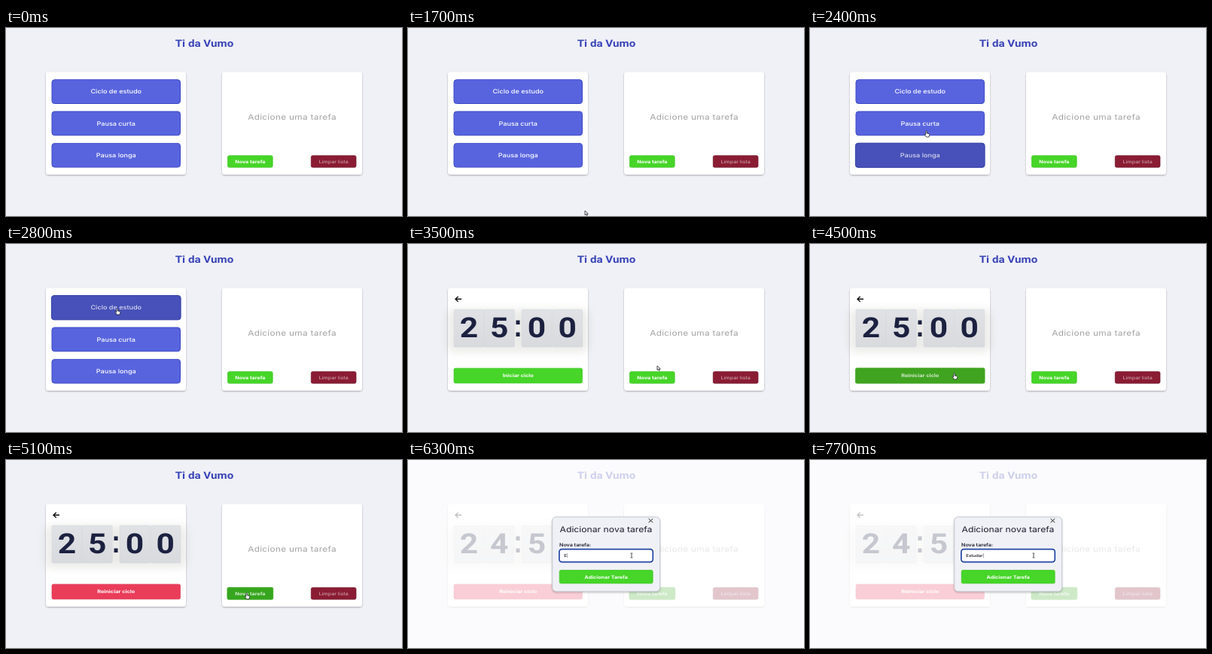
An HTML page that plays this animation: 526 px wide and 250 px high, repeating every 8000 ms.

```html
<!DOCTYPE html>
<html lang="pt">
<head>
<meta charset="utf-8">
<title>Ti da Vumo</title>
<style>
  html, body { margin: 0; width: 100%; height: 100%; overflow: hidden; background: #f0f1f6; }
  svg { display: block; width: 526px; height: 250px; }
  text { font-family: Inter, "Open Sans", sans-serif; text-rendering: geometricPrecision; }
  .square { font-family: Roboto, "Liberation Sans", sans-serif; }
</style>
</head>
<body>
<svg viewBox="0 0 526 250" xmlns="http://www.w3.org/2000/svg">
  <defs>
    <filter id="soft" x="-20%" y="-40%" width="140%" height="180%"><feGaussianBlur stdDeviation="6"/></filter>
    <filter id="lift" x="-5%" y="-5%" width="110%" height="115%">
      <feDropShadow dx="0" dy="1" stdDeviation="1.2" flood-color="#000" flood-opacity=".3"/>
    </filter>
    <linearGradient id="flap" x1="0" y1="0" x2="0" y2="1">
      <stop offset="0" stop-color="#e0e2e5"/><stop offset="1" stop-color="#d8dade"/>
    </linearGradient>
    <clipPath id="upper"><path d="M0 80H526V112H0z"/></clipPath>
    <clipPath id="lower"><path d="M0 112H526V145H0z"/></clipPath>
  </defs>
  <g id="scene"></g>
</svg>
<script>
const LOOP = 8000, STEP = 100, STRETCH = 1.15;
const scene = document.getElementById('scene');

// Pointer route: time, x, y
const ROUTE = [
  [1700, 235, 243], [2000, 230, 238], [2200, 190, 183], [2400, 154, 137],
  [2600, 147, 101], [2800, 147, 86], [3000, 148, 87], [3200, 220, 132],
  [3400, 322, 162], [3500, 331, 162], [3700, 328, 173], [3800, 312, 176],
  [4000, 240, 176], [4200, 195, 173], [4500, 191, 172], [4600, 191, 172],
  [4800, 230, 174], [5000, 306, 177], [5100, 319, 177], [5300, 319, 176],
  [5500, 308, 128], [5700, 297, 127], [8000, 297, 127]
];
const KEYS = [6300, 6600, 6900, 7100, 7300, 7500, 7700];
const WORD = 'Estudar';

const ramp = (t, a, b) => Math.min(1, Math.max(0, (t - a) / (b - a)));
const hover = (t, from, to) => ramp(t, from, from + 150) * (1 - ramp(t, to, to + 200));

function mix(a, b, k) {
  const part = (c, i) => parseInt(c.slice(i, i + 2), 16);
  return `rgb(${[1, 3, 5].map(i => Math.round(part(a, i) + (part(b, i) - part(a, i)) * k))})`;
}

function label(str, x, y, size, fill, weight = 400, extra = 'text-anchor="middle"') {
  return `<text transform="translate(${x} ${y}) scale(${STRETCH} 1)" font-size="${size}" ` +
    `font-weight="${weight}" fill="${fill}" ${extra}>${str}</text>`;
}

const box = (x, y, w, h, r, fill, extra = '') =>
  `<rect x="${x}" y="${y}" width="${w}" height="${h}" rx="${r}" fill="${fill}" ${extra}/>`;

// A button that darkens and grows slightly while hovered
function button(x, y, w, h, str, size, c, k = 0) {
  const g = k * 0.6;
  return box(x - g, y - g / 2, w + 2 * g, h + g, c.r || 2, mix(c.fill, c.dark, k),
      `stroke="${mix(c.edge, c.darkEdge || c.dark, k)}" stroke-width="${c.line || .7}"`) +
    label(str, x + w / 2, y + h / 2 + size * .36, size, c.text || '#ffffff', c.weight || 700,
      `text-anchor="middle" fill-opacity="${1 - .22 * k}"`);
}

const BLUE = { fill: '#5864de', dark: '#4751b9', edge: '#3d48c6', darkEdge: '#343ea6', r: 3.5, line: 1, weight: 500 };
const GREEN = { fill: '#46d528', dark: '#36a61e', edge: '#3cc520' };
const WINE = { fill: '#8a1c33', dark: '#8a1c33', edge: '#6f1026', text: '#cb9ca6', weight: 500 };

function menu(t) {
  return button(61, 68.8, 170.5, 31.7, 'Ciclo de estudo', 7.9, BLUE, hover(t, 2600, 3200)) +
    button(61, 111, 170.5, 31.7, 'Pausa curta', 7.9, BLUE, hover(t, 2400, 2550)) +
    button(61, 153.4, 170.5, 31.7, 'Pausa longa', 7.9, BLUE, hover(t, 2100, 2400));
}

function tile(x, digit) {
  return box(x, 87, 40, 50, 1.5, 'url(#flap)', 'stroke="#cfd1d6" stroke-width=".4"') +
    label(digit, x + 20, 124, 37, '#1c2140', 700, 'class="square" text-anchor="middle"');
}

function flipTile(x, from, to, p) {
  if (from === to || p <= 0) return tile(x, from);
  if (p >= 1) return tile(x, to);
  const half = (side, d, k = 1) => `<g transform="translate(0 112) scale(1 ${k}) translate(0 -112)">` +
    `<g clip-path="url(#${side})">${tile(x, d)}</g></g>`;
  const turn = Math.cos(p * Math.PI);
  return half('upper', to) + half('lower', from) +
    (turn > 0 ? half('upper', from, turn) : half('lower', to, -turn));
}

function timer(t) {
  const p = ramp(t, 5300, 5700), spots = [61, 101.3, 151, 191.8];
  const started = t >= 4400, red = ramp(t, 4700, 4900);
  const look = started
    ? { fill: '#ea3d5a', dark: '#40a420', edge: '#d93450' }
    : { ...GREEN, dark: '#40a420' };
  const k = started ? 1 - red : hover(t, 4050, 9000);
  return box(52, 87, 188, 57, 8, '#6b705f', 'opacity=".13" filter="url(#soft)"') +
    spots.map((x, i) => flipTile(x, '2500'[i], '2459'[i], p)).join('') +
    '<path d="M143.5 101.5h5v5.5h-5zM143.5 117.5h5v5.5h-5z" fill="#1c2140"/>' +
    '<path d="M71 73.3H63.2M66.7 69.8L63 73.3l3.7 3.5" fill="none" stroke="#111" stroke-width="1.4"/>' +
    button(61, 165.2, 170.5, 19.8, started ? 'Reiniciar ciclo' : 'Iniciar ciclo', 6.4, look, k);
}

function page(t) {
  const add = Math.max(hover(t, 3550, 3800), hover(t, 4950, 9000));
  return box(0, 0, 526, 250, 0, '#f0f1f6') +
    label('Ti da Vumo', 263.5, 25, 13.2, '#3a45b8', 600, 'class="square" text-anchor="middle"') +
    [53, 287].map(x => box(x, 58.5, 186, 136.5, 4, '#ffffff', 'filter="url(#lift)"')).join('') +
    (t < 3000 ? menu(t) : timer(t)) +
    label('Adicione uma tarefa', 380, 121.7, 10.3, '#a3a3a3', 400, 'text-anchor="middle" letter-spacing=".25"') +
    button(294.5, 169.7, 59.7, 15.6, 'Nova tarefa', 6.2, GREEN, add) +
    button(405.3, 169.7, 59.7, 15.6, 'Limpar lista', 6.2, WINE);
}

function dialog(t) {
  const k = ramp(t, 5300, 5500);
  if (!k) return '';
  const focus = t >= 5800;
  const typed = WORD.slice(0, KEYS.filter(at => t >= at).length);
  const left = 'text-anchor="start"';
  const caret = focus ? '<tspan font-weight="300" dx="-.3">|</tspan>' : '';
  return box(0, 0, 526, 250, 0, '#ffffff', `opacity="${.75 * k}"`) + `<g opacity="${k}">` +
    box(191.8, 75.8, 142.8, 99, 5, '#f0f1f6', 'stroke="#c3c6ce" stroke-width=".9" filter="url(#lift)"') +
    '<path d="M319.6 78l5.6 5.2M325.2 78l-5.6 5.2" stroke="#222" stroke-width="1"/>' +
    label('Adicionar nova tarefa', 263, 96, 10.6, '#1b1d2e', 400) +
    label('Nova tarefa:', 201, 115.3, 6.2, '#1b1d2e', 600, left) +
    box(200.9, 118.6, 124.4, 17, 3.5, '#ffffff',
      focus ? 'stroke="#2346a5" stroke-width="1.7"' : 'stroke="#8d90a0" stroke-width=".7"') +
    label(typed + caret, 207.3, 129.3, 5.3, '#14151f', 500, left) +
    button(201.2, 146.5, 124, 17.6, 'Adicionar Tarefa', 6.2, GREEN) + '</g>';
}

const ARROW = 'M0 0V5.6L1.4 4.4 2.4 6.4 3.4 6 2.5 4H4.3z';
const HAND = 'M0 0C.9-.6 1.4 0 1.4.8V3L4 3.6C4.7 3.9 4.8 4.6 4.6 5.4L3.9 8H.6L-1.8 4.9C-2 4.2-1.3 3.9-.8 4.3L-.2 4.9V.5z';

function pointer(t) {
  if (t < ROUTE[0][0]) return '';
  const i = ROUTE.findIndex(r => r[0] > t);
  const [ta, xa, ya] = ROUTE[i - 1], [tb, xb, yb] = ROUTE[i];
  const k = ramp(t, ta, tb), x = xa + (xb - xa) * k, y = ya + (yb - ya) * k;
  const at = `transform="translate(${x} ${y})"`;
  if (t >= 5500) {
    return `<path ${at} d="M-1.4-3H-.4L0-2.6.4-3H1.4M0-2.6V2.6M-1.4 3H-.4L0 2.6.4 3H1.4" fill="none" stroke="#222" stroke-width=".8"/>`;
  }
  const inside = (l, r, a, b) => x > l && x < r && y > a && y < b;
  const hand = t < 3000
    ? inside(60, 232, 68, 185)
    : inside(60, 232, 165, 186) || inside(294, 355, 169, 186);
  return `<path ${at} d="${hand ? HAND : ARROW}" fill="#fff" stroke="#1c1c24" stroke-width=".8" stroke-linejoin="round"/>`;
}

let shown = -1;
const start = performance.now();

function tick(now) {
  const t = Math.floor(Math.max(0, now - start) % LOOP / STEP) * STEP;
  if (t !== shown) {
    scene.innerHTML = page(t) + dialog(t) + pointer(t);
    shown = t;
  }
  requestAnimationFrame(tick);
}
tick(start);
</script>
</body>
</html>
```
